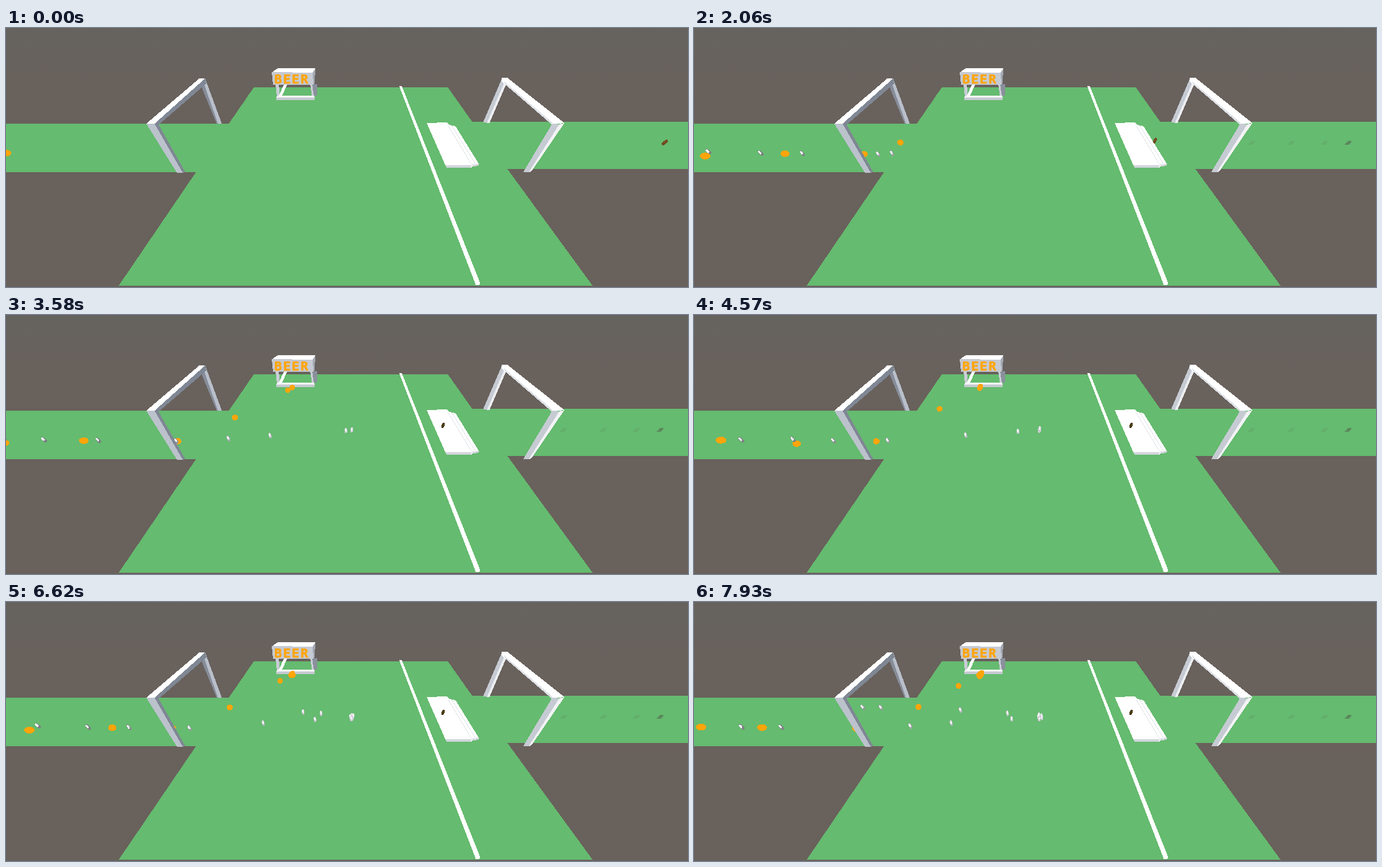
Animation, 1065 px wide and 406 px high, one loop 7.96 s. Source, as an HTML page:

```html
<!DOCTYPE html>
<html lang="en">
<head>
<meta charset="utf-8">
<title>Beer stand</title>
<style>
html, body { margin: 0; width: 100%; height: 100%; overflow: hidden; background: #69615c; }
svg { display: block; width: 100vw; height: 100vh; shape-rendering: crispEdges; }
.sign {
  font: bold 19.5px "DejaVu Sans Mono", monospace; letter-spacing: 1.9px;
  fill: #ffa50a; stroke: #ffa50a; stroke-width: .7px;
}
</style>
</head>
<body>
<svg viewBox="0 0 1065 406" preserveAspectRatio="none">
  <defs>
    <linearGradient id="sky" x2="0" y2="1">
      <stop offset="0" stop-color="#66635f"/>
      <stop offset=".13" stop-color="#68625e"/>
      <stop offset=".3" stop-color="#69615c"/>
    </linearGradient>
  </defs>
  <rect width="1065" height="406" fill="url(#sky)"/>
  <path fill="#65bb6f" d="M387 93H690L728 147H1065V221H783L916 404H176L297 225.500H0V150H348Z"/>
  <path fill="#fff" d="M614 91H618L740.500 400L739 402.500H733.500Z"/>

  <g id="stall">
    <path fill="#c9cdd5" d="M421 88H426L428 108H423ZM475 88H479L482 108H478Z"/>
    <path fill="#8a909c" d="M478 88H486V105L481 107Z"/>
    <path fill="#fff" d="M434 89H439L431 106H426Z"/>
    <path fill="#f4f5f6" d="M424 106H481L482 109H422Z"/>
    <path fill="#c6cad2" d="M422 109H482V113H422Z"/>
    <path fill="#fff" d="M425 62.500H483L481 71L416 69Z"/>
    <path fill="#c6cad2" d="M415 69L479 70L480 89L417 89Z"/>
    <path fill="#a3a9b4" d="M479 70L483 63L482 86L480 89Z"/>
    <text class="sign" x="419" y="86.500">BEER</text>
  </g>

  <g id="bench">
    <path fill="#fff" d="M657 149L689 148L692 152L702 154L739 214L728 217L726 219H688L686 215Z"/>
    <path fill="#d3d6dd" d="M686 215H727L726 219H688ZM728 214L739 213L738 216L729 217Z"/>
    <path fill="none" stroke="#e3e6ea" d="M690 152L727 214M696 153L733 213"/>
  </g>

  <g id="rightGoal">
    <path fill="#c6cbd3" d="M745 148L774 80L782 86L755 149Z"/>
    <path fill="#eceef1" d="M751 149L778 86L782 86L755 149Z"/>
    <path fill="#fff" d="M774 78H783L872 149L853 151L774 84Z"/>
    <path fill="#dfe2e7" d="M778 84L853 148V152L779 88Z"/>
    <path fill="#c6cbd3" d="M853 150L868 151L819 225.500H808Z"/>
    <path fill="#f2f3f5" d="M864 151L872 149L821 224L817 225Z"/>
  </g>

  <path fill="#b9bfca" d="M303 87L311 79L337 150H329Z"/>
  <path fill="#868d9a" d="M303 87L310 90L331 150H329Z"/>
  <g id="marks"></g>
  <g id="crew"></g>

  <g id="leftGoal">
    <path fill="#7f8794" d="M228 150L302 82L311 79L313 87L238 152Z"/>
    <path fill="#fff" d="M219 150L302 79H311L232 150Z"/>
    <path fill="#bcc2cc" d="M219 150H233L277 227H267Z"/>
    <path fill="#7f8794" d="M232 150L238 151L280 226L276 227Z"/>
  </g>
</svg>
<script>
const LOOP = 7960;

// Moments at which a walker steps in at the left edge.
const BALL_BORN = [0, 450, 1200, 1955, 2845, 3600, 4315, 5045, 5615, 6400, 7288, 7863];
const PEG_BORN = [129, 264, 1004, 1410, 1920, 2680, 3210, 3605, 4110, 4830, 5420, 5820, 6310, 7080, 7467];

const BALL_SPEED = 0.165, PEG_SPEED = 0.16, HOME_SPEED = 0.153, GUEST_SPEED = 0.15;
const TURN = 287;
const STALL = { x: 447, y: 115 };
const TABLE = { x: 540, y: 180 };

const svgNS = "http://www.w3.org/2000/svg";
const crew = document.getElementById("crew");
const clamp = v => Math.max(0, Math.min(1, v));
const ramp = (v, a, b) => clamp((v - a) / (b - a));
const mix = (a, b, k) => a + (b - a) * k;

function set(el, attrs) {
  for (const k in attrs) el.setAttribute(k, attrs[k]);
}
function add(parent, tag, attrs) {
  const el = document.createElementNS(svgNS, tag);
  set(el, attrs);
  return parent.appendChild(el);
}

// Waiting walkers pack into a small spiral.
function seat(center, i) {
  const r = 1.2 * Math.sqrt(i);
  return { x: center.x + r * Math.cos(i * 2.4), y: center.y + r * Math.sin(i * 2.4) };
}

// Two walkers entering together step aside until they reach the goal.
const crowded = (born, others) => others.some(b => Math.abs(b - born) < 120);
const sidestep = x => 1 - ramp(x, 160, 260);

function ballAt(born, i, t) {
  const spot = seat(STALL, i);
  const d = (t - born) * BALL_SPEED;
  const x = Math.min(d < TURN ? d : TURN + (d - TURN) / 1.5, spot.x);
  let y = x < TURN ? mix(196, 198, ramp(x, 0, TURN)) : 198 - 0.527 * (x - TURN);
  y += (spot.y - STALL.y) * ramp(x, 430, spot.x);
  if (crowded(born, PEG_BORN)) y += 4.5 * sidestep(x);
  return { x, y };
}

function pegAt(born, i, t) {
  const spot = seat(TABLE, i);
  const leave = born + spot.x / PEG_SPEED + 2620 + 60 * i;
  if (t > leave) {
    const x = spot.x - HOME_SPEED * (t - leave);
    return { x, y: 165 + 14 * ramp(x, 261, TABLE.x) ** 2 };
  }
  const x = Math.min((t - born) * PEG_SPEED, spot.x);
  let y = x < 300 ? mix(195, 197.5, ramp(x, 0, 280)) : mix(197, 180, ramp(x, 300, TABLE.x));
  y += (spot.y - TABLE.y) * ramp(x, 520, spot.x);
  if (crowded(born, BALL_BORN)) y -= 1.5 * sidestep(x);
  return { x, y };
}

function makePeg() {
  const g = add(crew, "g", { "stroke-linecap": "round" });
  return { dark: add(g, "line"), lit: add(g, "line") };
}

// Upright pegs lean away from the middle of the wide view.
function placePeg(peg, { x, y }, dark, light) {
  const lean = (x - 532) / 500, wide = Math.abs(lean);
  const angle = Math.atan(lean * 1.35);
  const half = 2.2 + wide * 0.9;
  const dx = Math.sin(angle) * half, dy = -Math.cos(angle) * half;
  const w = 3.8 + wide;
  set(peg.dark, { x1: x - dx, y1: y - dy, x2: x + dx, y2: y + dy, stroke: dark, "stroke-width": w });
  set(peg.lit, {
    x1: x - dx * 0.2 - wide * 0.9, y1: y - dy * 0.2,
    x2: x + dx - wide * 0.4, y2: y + dy, stroke: light, "stroke-width": w * 0.68
  });
}

const marks = [1022, 985, 933, 871].map((x, i) => ({
  x,
  el: add(document.getElementById("marks"), "path", {
    d: `M${x - 6} 183L${x} 176.500H${x + 6}L${x + 1} 183Z`,
    fill: "#4f4a4a", opacity: i ? 0.1 : 0.45
  })
}));
const balls = BALL_BORN.map(() => add(crew, "ellipse", { fill: "#ffa50a" }));
const pegs = PEG_BORN.map(makePeg);
const guest = makePeg();

function draw(t) {
  balls.forEach((el, i) => {
    const { x, y } = ballAt(BALL_BORN[i], i, t);
    const far = ramp(x, 100, 440);
    set(el, { cx: x, cy: y, rx: 8.3 - 4 * Math.sqrt(far), ry: 5.3 - far });
  });
  pegs.forEach((peg, i) => {
    const p = pegAt(PEG_BORN[i], i, t);
    const grey = mix(125, 198, ramp(p.x, 150, 500));
    placePeg(peg, p, `rgb(${grey},${grey + 2},${grey + 8})`, "#f1f2f4");
  });

  const x = Math.max(682.5, 1029 - GUEST_SPEED * t);
  const seated = x < 705;
  placePeg(guest, { x, y: mix(173, 176.5, ramp(x, 682, 721)) + 3 * ramp(x, 721, 1029) },
    seated ? "#453512" : "#70481f", seated ? "#4e3c16" : "#774d25");
  for (const m of marks) m.el.style.display = x < m.x - 12 ? "" : "none";
}

const start = performance.now();
function tick() {
  draw((performance.now() - start) % LOOP);
  requestAnimationFrame(tick);
}
draw(0);
requestAnimationFrame(tick);
</script>
</body>
</html>
```
